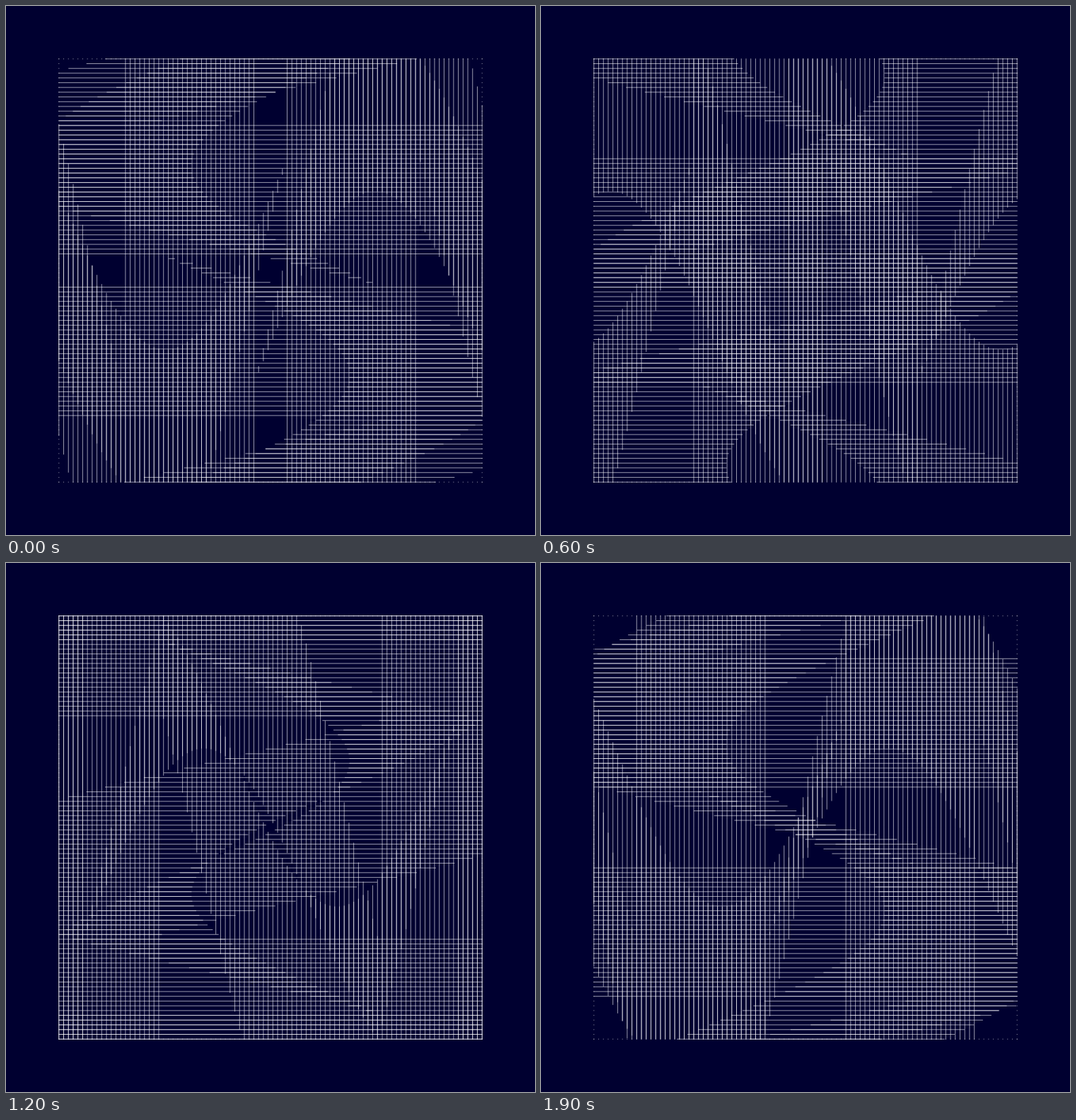
Animation, 748 px wide and 748 px high, one loop 2000 ms. Source, as an HTML page with a canvas:

```html
<!DOCTYPE html>
<html lang="en">
<head>
<meta charset="utf-8">
<title>Woven waves</title>
<style>
  html, body { margin: 0; width: 100%; height: 100%; overflow: hidden; background: #000030; }
  canvas { display: block; width: 100vmin; height: 100vmin; margin: auto; }
</style>
</head>
<body>
<canvas id="stage" width="748" height="748"></canvas>
<script>
const SIZE = 748, UNIT = SIZE / 100;
const LINES = 90, NEAR = 10, FAR = 90;
const STEPS = 20, STEP_MS = 100;
const ctx = document.getElementById('stage').getContext('2d');

// A length that swings around 25 units and may go below zero.
const swing = degrees => 25 + 30 * Math.cos(degrees * Math.PI / 180);

function segment(x, from, to) {
  ctx.moveTo(x, from);
  ctx.lineTo(x, to);
}

// One set of parallel lines; each has a gap, then a dash, measured from its far end.
function drawLayer(step) {
  ctx.beginPath();
  for (let i = 1; i <= LINES; i++) {
    const x = NEAR + (FAR - NEAR) * (i - 1) / (LINES - 1);
    const phase = (i / LINES - step / STEPS) * 360;
    const gap = swing(phase + 90);
    const dash = swing(phase + 45);
    if (gap < 0 || dash < 0) {
      segment(x, NEAR, FAR);
    } else {
      const end = FAR - gap;
      segment(x, FAR - 0.001, FAR);
      segment(x, Math.max(NEAR, end - dash), end);
    }
  }
  ctx.stroke();
}

function draw(step) {
  ctx.setTransform(1, 0, 0, 1, 0, 0);
  ctx.fillStyle = '#000030';
  ctx.fillRect(0, 0, SIZE, SIZE);
  ctx.strokeStyle = 'rgba(255, 255, 255, 0.8)';
  ctx.lineWidth = 0.1;
  ctx.lineCap = 'square';
  for (let turn = 0; turn < 4; turn++) {
    ctx.setTransform(UNIT, 0, 0, UNIT, SIZE / 2, SIZE / 2);
    ctx.rotate(turn * Math.PI / 2);
    ctx.translate(-50, -50);
    drawLayer(step);
  }
}

const start = performance.now();
let shown = -1;
function tick() {
  const step = Math.floor((performance.now() - start) / STEP_MS) % STEPS;
  if (step !== shown) draw(shown = step);
  requestAnimationFrame(tick);
}
tick();
</script>
</body>
</html>
```
